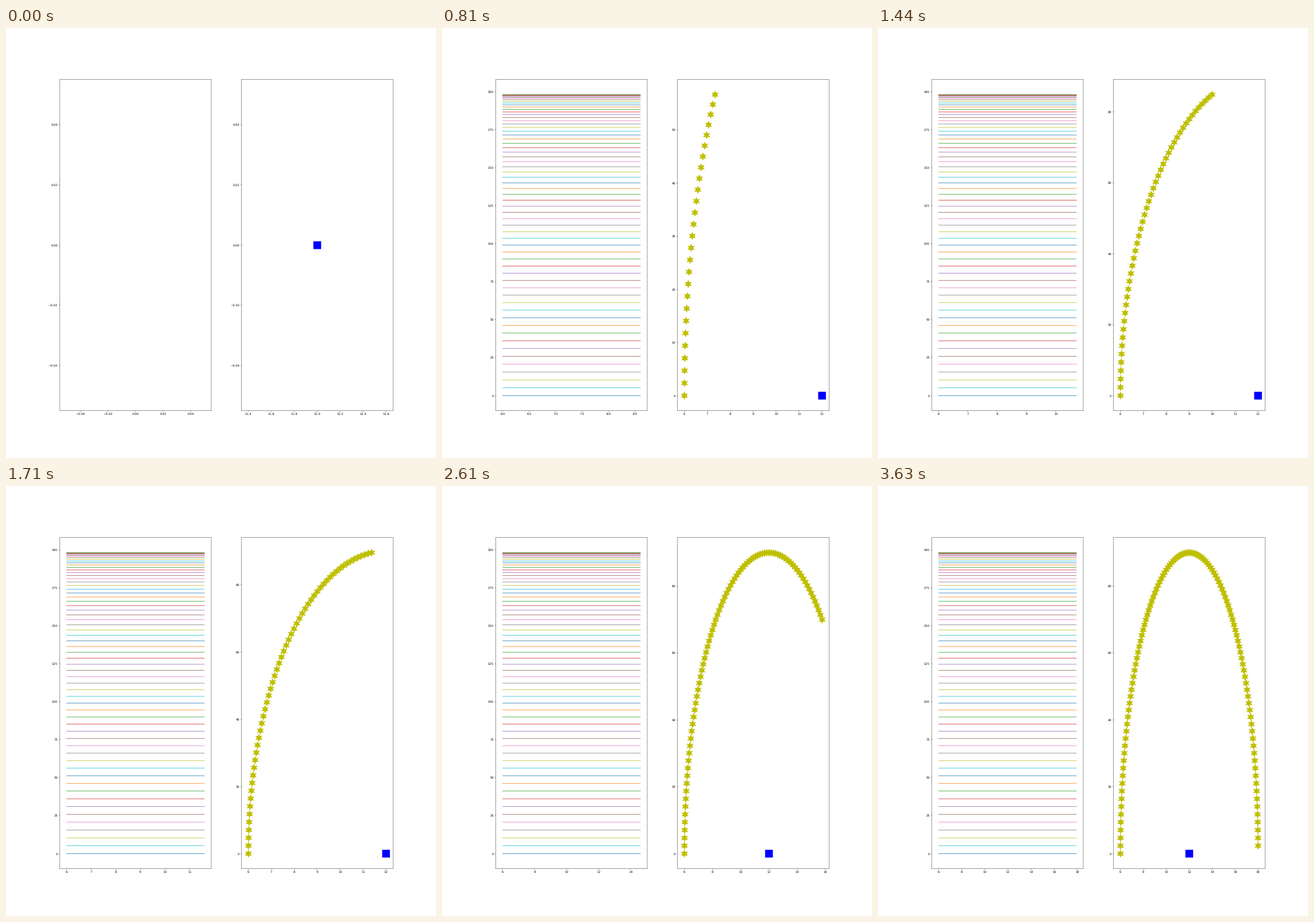
A matplotlib script for the animation above (3660 ms loop, 748 by 748 pixels).

```python
import numpy as np
import matplotlib.pyplot as plt
from matplotlib.animation import FuncAnimation

STEPS = 120
FRAMES = STEPS + 2
INTERVAL = 30
SIZE = 25
BASE = (12, 0)

# keep sub-pixel positions at this low resolution
plt.rcParams["path.snap"] = False
plt.rcParams["text.hinting"] = "no_hinting"

angle = np.radians(1.5 * np.arange(STEPS))
heights = 198 * np.sin(angle)
ramp = 6 + 0.1 * np.arange(STEPS)
arc = np.column_stack([12 - 6 * np.cos(angle), 90 * np.sin(angle)])

fig, (left, right) = plt.subplots(1, 2, figsize=(20, 20), dpi=37.4)

# the falling half of the sine covers the rising half, except the base line
visible = [0, *range(STEPS // 2, STEPS)]
levels = [left.plot([], [], color=f"C{k % 10}")[0] for k in visible]


def add_markers(marker, color):
    """Markers that are not rounded to whole pixels."""
    dots = right.scatter([], [], s=SIZE ** 2, marker=marker,
                         edgecolors=color, linewidths=1)
    # two face colours avoid the pixel-aligned stamping of single-style dots
    dots.set_facecolor([color, color])
    dots.set_joinstyle("miter" if marker == "s" else "bevel")
    return dots


stars = add_markers((6, 1), "y")
square = add_markers("s", "b")
square.set_offsets([BASE])


def update(frame):
    count = min(frame, STEPS)
    for line, k in zip(levels, visible):
        line.set_data(ramp[:count], np.full(count, heights[k]))
    stars.set_offsets(arc[:count])

    if count:
        left.relim()
        left.autoscale_view()
    else:
        # empty axes keep old limits, so restore the defaults
        left.set_xlim(-0.055, 0.055, auto=True)
        left.set_ylim(-0.055, 0.055, auto=True)

    right.relim()
    right.update_datalim(np.vstack([arc[:count], BASE]))
    right.autoscale_view()
    return [*levels, stars]


anim = FuncAnimation(fig, update, frames=FRAMES, interval=INTERVAL,
                     repeat=True, repeat_delay=0, blit=False)
plt.show()
```
